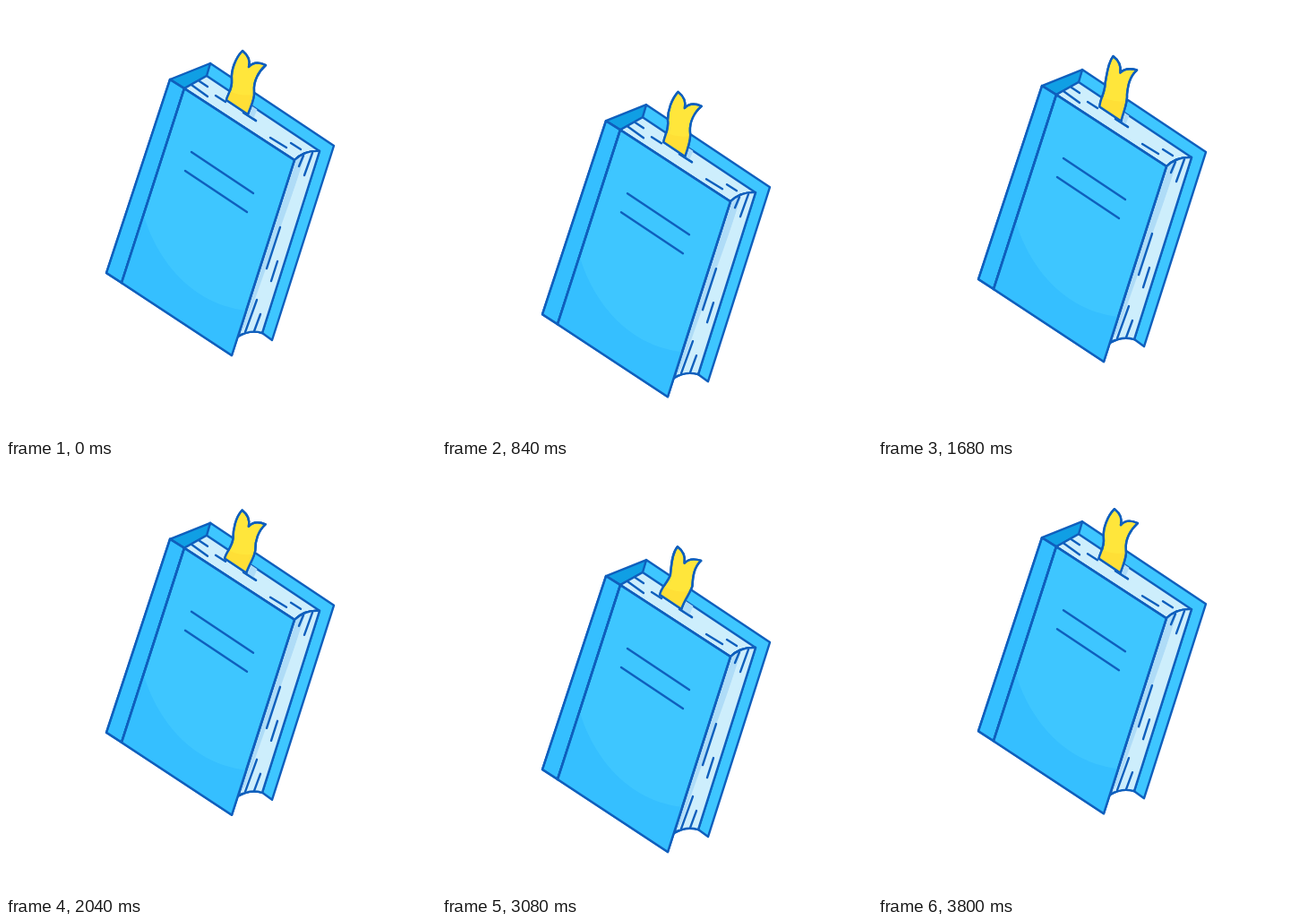
An HTML page with a canvas for the animation above (3.84 s loop, 480 by 480 pixels).

```html
<!DOCTYPE html>
<html lang="en">
<head>
<meta charset="utf-8">
<title>Floating book</title>
<style>
  html, body { margin: 0; width: 100%; height: 100%; overflow: hidden; background: #fff; }
  canvas { display: block; width: 480px; height: 480px; }
</style>
</head>
<body>
<canvas id="stage" width="480" height="480"></canvas>
<script>
const ctx = document.getElementById('stage').getContext('2d');
const LOOP = 3840, STEP = 40, BOB = 1920, WAVE = 960;
const INK = '#0f5fbd', COVER = '#3ec6ff', SHADE = '#35bfff', PAPER = '#cdeefc', PAPER_SHADE = '#afdcf7';

const FRONT = 'M199 92 L322 172 L252 390 L129 309 Z';
const SPINE = 'M183 82 L199 92 L129 309 L112 298 Z';
const BACK = 'M228 64 L366 156 L297 373 L286 365 L223 78 Z';
const TOP_PAGES = 'M199 92 L224 78 L350 162 Q333 161 322 172 Z';
const SIDE_PAGES = 'M322 172 Q333 161 350 162 L286 365 Q272 361 259 369 Z';
const DASHES = `M207 88 L225 101 M216 84 L225 90 M234 100 L245 107 M265 119 L279 128
  M295 147 L313 158 M318 153 L329 160
  M332 167 L327 179 M342 164 L333 189
  M306 247 L291 293 M303 285 L296 307
  M280 328 L267 364 M284 344 L277 363`;
const TITLE = 'M207 163 L276 209 M200 184 L269 230';

function paint(path, fill, stroke = true) {
  const shape = new Path2D(path);
  if (fill) {
    ctx.fillStyle = fill;
    ctx.fill(shape);
  }
  if (stroke) ctx.stroke(shape);
}

function clipped(path, draw) {
  ctx.save();
  ctx.clip(new Path2D(path));
  draw();
  ctx.restore();
}

function drawBook() {
  paint(BACK, COVER);
  paint('M183 82 L228 64 L224 78 L199 92 Z', '#109fe4');
  paint(TOP_PAGES, PAPER);
  paint(SIDE_PAGES, PAPER);
  clipped(SIDE_PAGES, () => paint('M322 172 L334 166 L276 345 L259 369 Z', PAPER_SHADE, false));
  clipped(SIDE_PAGES, () => paint('M331 178 L336 162 L352 160 L286 368 L262 372 Z', PAPER, false));
  paint(SIDE_PAGES);
  paint(DASHES);
  paint(SPINE, SHADE);
  paint(FRONT, COVER);
  const curve = 'M146 190 C150 260 195 333 270 340 L252 395 L105 305 Z';
  clipped(FRONT, () => paint(curve, SHADE, false));
  paint(FRONT);
  paint(SPINE);
  paint(TITLE);
}

// Each point eases between two poses; the third value is its sideways sway.
function drawRibbon(phase) {
  const mix = (1 - Math.cos(phase)) / 2, sway = -Math.sin(phase);
  const at = (x1, y1, x2, y2, s = 0) =>
    `${x1 + (x2 - x1) * mix + s * sway} ${y1 + (y2 - y1) * mix + s * sway * 0.65} `;

  const tip = at(264, 50, 261, 48);
  const foot = at(246, 105, 244.5, 103, 2.2);
  const heel = at(270, 121, 268.5, 119, 2.2);
  const ribbon = `M${tip}
    C${at(256, 58, 256, 57)}${at(251, 72, 262, 70, -1)}${at(252, 82, 257, 78, -1)}
    C${at(253, 93, 252, 86, 1)}${at(247, 99, 244, 93, 2)}${foot}
    L${heel}
    C${at(273, 112, 270, 108, 2)}${at(278, 104, 278, 98, 1)}${at(277, 95, 281, 89, -1)}
    C${at(276, 84, 284, 82, -1)}${at(282, 73, 279, 71)}${at(290, 66, 288, 63)}
    Q${at(278, 60, 275, 62)}${at(271, 68, 270, 67)}
    Q${at(274, 58, 270, 54)}${tip}Z`;

  clipped(TOP_PAGES, () =>
    paint(`M${heel}L${at(277, 98, 278, 95)}L282 112 L276 126 Z`, PAPER_SHADE, false));
  paint('M265 119 L279 128', null);
  paint(ribbon, '#ffe63b');
  clipped(ribbon, () =>
    paint(`M${foot}L${at(249, 95, 247, 92)}Q262 101 276 99 L${heel}Z`, '#ffdf36', false));
  paint(ribbon);
}

function render(now) {
  const t = Math.floor((now % LOOP) / STEP) * STEP;
  const drop = 24 * (1 - Math.cos(2 * Math.PI * t / BOB));
  ctx.setTransform(1, 0, 0, 1, 0, 0);
  ctx.fillStyle = '#fff';
  ctx.fillRect(0, 0, 480, 480);
  ctx.translate(0, drop);
  ctx.strokeStyle = INK;
  ctx.lineWidth = 2.4;
  ctx.lineCap = ctx.lineJoin = 'round';
  drawBook();
  drawRibbon(2 * Math.PI * t / WAVE);
}

const start = performance.now();
function tick() {
  render(performance.now() - start);
  requestAnimationFrame(tick);
}
tick();
</script>
</body>
</html>
```
